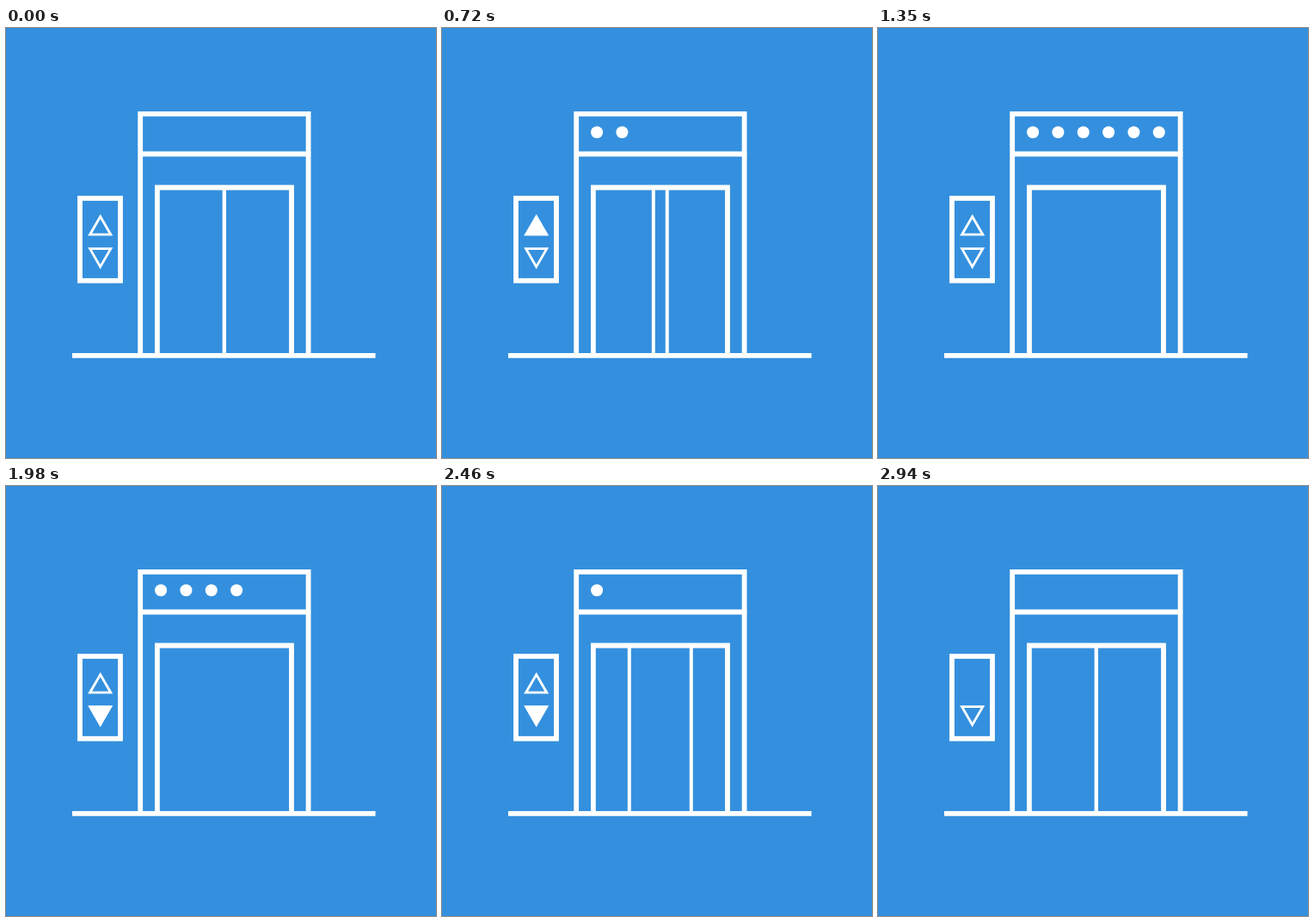
Animation, 500 px wide and 500 px high, one loop 2970 ms. Source, as an HTML page:

```html
<!DOCTYPE html>
<html lang="en">
<head>
<meta charset="utf-8">
<title>Elevator</title>
<style>
  html, body { margin: 0; width: 100%; height: 100%; overflow: hidden; background: #3490de; }
  svg { display: block; width: 100%; height: 100%; }
</style>
</head>
<body>
<svg viewBox="0 0 500 500" fill="none" stroke="#fff" stroke-width="5.8">
  <g stroke-width="4">
    <path id="leftDoor" d="M253.8 187V379"/>
    <path id="rightDoor" d="M253.8 187V379"/>
  </g>
  <path d="M77 380.9H429.6"/>
  <path d="M156.2 381V99.8H351.6V381M153.3 146.5H354.6"/>
  <path d="M175.9 381V185.5H332V381"/>
  <rect x="86" y="198" width="47" height="95.8"/>
  <g stroke-width="2.8">
    <path id="up" d="M109.7 219.3L121.8 240.2H97.6Z"/>
    <path id="down" d="M109.7 277.6L121.8 256.7H97.6Z"/>
  </g>
  <g id="dots" fill="#fff" stroke="none"></g>
</svg>
<script>
const LOOP = 2970, STEP = 30, TRAVEL = 78, SLIDE = 930;
const OPEN_AT = 491, CLOSE_AT = 1977;
const [leftDoor, rightDoor, up, down, dotGroup] =
  ['leftDoor', 'rightDoor', 'up', 'down', 'dots'].map(id => document.getElementById(id));

const dots = Array.from({ length: 6 }, (_, i) => {
  const dot = document.createElementNS('http://www.w3.org/2000/svg', 'circle');
  dot.setAttribute('cx', 180.1 + 29.33 * i);
  dot.setAttribute('cy', 121.3);
  dot.setAttribute('r', 7);
  return dotGroup.appendChild(dot);
});

// cubic-bezier(.5, 0, .5, 1), solved by bisection
function ease(x) {
  if (x <= 0) return 0;
  if (x >= 1) return 1;
  let low = 0, high = 1;
  for (let i = 0; i < 24; i++) {
    const s = (low + high) / 2;
    if (1.5 * s * (1 - s) + s ** 3 < x) low = s; else high = s;
  }
  return low * low * (3 - 2 * low);
}

const show = (el, on) => el.setAttribute('visibility', on ? 'visible' : 'hidden');
const light = (el, on) => el.setAttribute('fill', on ? '#fff' : 'none');
const shift = (el, x) => el.setAttribute('transform', `translate(${x} 0)`);

function draw(now) {
  const t = Math.floor((now % LOOP) / STEP) * STEP;
  const gap = TRAVEL * (ease((t - OPEN_AT) / SLIDE) - ease((t - CLOSE_AT) / SLIDE));
  shift(leftDoor, -gap);
  shift(rightDoor, gap);
  light(up, t >= 180 && t < 1350);
  light(down, t >= 1830 && t < 2940);
  show(up, t < 2940);
  dots.forEach((dot, i) => show(dot, t >= 420 + 180 * i && t < 1830 + 150 * (5 - i)));
}

function tick(now) {
  draw(now);
  requestAnimationFrame(tick);
}
draw(0);
requestAnimationFrame(tick);
</script>
</body>
</html>
```
